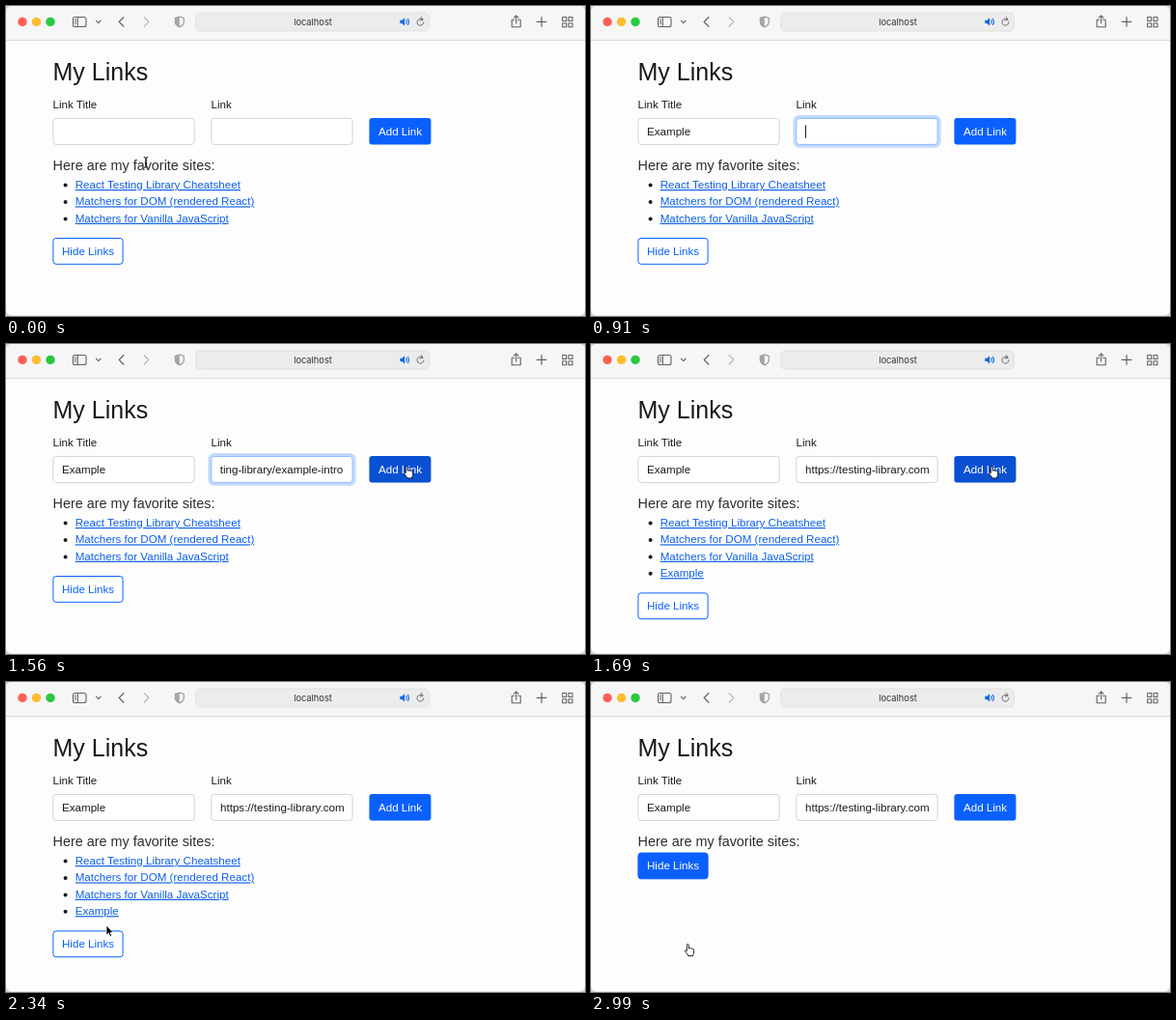
Write an HTML page that moves like this. It is 600 by 321 pixels and loops after 3250 ms.

```html
<!DOCTYPE html>
<html lang="en">
<head>
<meta charset="utf-8">
<title>My Links</title>
<style>
  html, body { margin: 0; height: 100%; overflow: hidden; background: #d2d2d2; }
  svg { display: block; width: 600px; height: 321px; font: 11.6px "Liberation Sans", Arial, sans-serif; fill: #17191c; }
  .icon { fill: none; stroke: #636363; stroke-width: 1.1; stroke-linecap: round; stroke-linejoin: round; }
  .pale { stroke: #b9b9b9; }
  .field rect { fill: #fff; stroke: #cfd3d8; }
  .field .ring { fill: none; stroke: #c2dafe; stroke-width: 3; visibility: hidden; }
  .focus .ring { visibility: visible; }
  .focus .box { stroke: #86b5fe; }
  .link { fill: #0b5fe8; text-decoration: underline; }
  .link.hover { fill: #0a48b0; }
  .solid { fill: #0a60fe; }
  .solid.hover { fill: #0a50d2; }
  .outline rect { fill: #fff; stroke: #0a60fe; }
  .outline text { fill: #0a60fe; }
  .outline.hover rect { fill: #0a60fe; }
  .outline.hover text { fill: #fff; }
</style>
</head>
<body>
<svg viewBox="0 0 600 321">
  <defs>
    <clipPath id="window"><rect width="600" height="320.5" rx="6"/></clipPath>
    <clipPath id="urlArea"><rect x="221.5" y="118" width="128.8" height="24"/></clipPath>
  </defs>

  <g clip-path="url(#window)">
    <rect width="600" height="321" fill="#fdfdfd"/>
    <rect width="600" height="35.5" fill="#f6f6f6"/>
    <rect y="35" width="600" height="1" fill="#d9d9d9"/>
  </g>

  <circle cx="17" cy="16.4" r="4.7" fill="#ff5f57"/>
  <circle cx="31.5" cy="16.4" r="4.7" fill="#febc2e"/>
  <circle cx="46" cy="16.4" r="4.7" fill="#28c840"/>

  <g class="icon">
    <rect x="69.5" y="11.5" width="13.5" height="10" rx="2"/>
    <path d="M74.3 11.5v10M71.3 14h1.3M71.3 16h1.3M71.3 18h1.3"/>
    <path d="M93.4 15.2l2.4 2.4 2.4-2.4"/>
    <path d="M121.8 11.8l-4.6 4.6 4.6 4.6" stroke-width="1.3"/>
    <path class="pale" d="M143.2 11.8l4.6 4.6-4.6 4.6" stroke-width="1.3"/>
    <path d="M179.8 11l4.5 1.6v4q0 3.4-4.5 5.2-4.5-1.8-4.5-5.2v-4z" stroke="#929292"/>
    <path d="M179.8 11v10.8q-4.5-1.8-4.5-5.2v-4z" fill="#a6a6a6" stroke="none"/>
  </g>

  <rect x="196.8" y="7" width="241.5" height="19" rx="4.5" fill="#ececec" stroke="#dcdcdc" stroke-width=".8"/>
  <text x="318" y="20" text-anchor="middle" font-family="Inter, sans-serif" font-size="9.3" fill="#333">localhost</text>
  <path d="M408.3 14.7h2l2.8-2.5v8.4l-2.8-2.5h-2z" fill="#1069e5"/>
  <g class="icon">
    <path d="M414.8 14.6q1.2 1.8 0 3.6M416.4 13.3q2.2 3.1 0 6.2" stroke="#1069e5"/>
    <path d="M432 14.2a3.5 3.5 0 1 0 1 2.5M430.2 11.4l1.9 2.7-3 .9" stroke-width=".9"/>
    <path d="M526.7 14.2h-2.5v7.6h9v-7.6h-2.5M528.7 18v-8M526.4 12.1l2.3-2.3 2.3 2.3"/>
    <path d="M555 11.6v9.6M550.2 16.4h9.6" stroke-width="1.2"/>
    <path d="M576.7 11.5h4v4h-4zM583 11.5h4v4h-4zM576.7 17.8h4v4h-4zM583 17.8h4v4h-4z"/>
  </g>

  <text x="48.5" y="77" font-size="25">My Links</text>
  <text x="48.5" y="106">Link Title</text>
  <text x="212.5" y="106">Link</text>

  <g class="field" id="titleField">
    <rect class="ring" x="47" y="114.6" width="150" height="30.6" rx="4.5"/>
    <rect class="box" x="48.9" y="116.4" width="146.3" height="27" rx="3"/>
    <text id="title" x="58" y="133.5"></text>
  </g>
  <g class="field" id="urlField">
    <rect class="ring" x="211" y="114.6" width="150" height="30.6" rx="4.5"/>
    <rect class="box" x="212.8" y="116.4" width="146.3" height="27" rx="3"/>
    <g clip-path="url(#urlArea)"><text id="url" y="133.5"></text></g>
  </g>
  <rect id="caret" y="123.3" width="1" height="13.4"/>

  <rect id="add" class="solid" x="376.4" y="116" width="64" height="27.6" rx="3"/>
  <text x="386" y="133.5" fill="#fff">Add Link</text>

  <text x="48.5" y="170.3" font-size="14.4" fill="#2c2e31">Here are my favorite sites:</text>
  <g id="list"></g>

  <g id="hide" class="outline">
    <rect x="48.9" y=".5" width="72.2" height="26.8" rx="3"/>
    <text x="58" y="17.7">Hide Links</text>
  </g>

  <g id="pointer">
    <path id="beam" d="M-2.2-5.5q2.2 0 2.2 1.5v8q0 1.5-2.2 1.5M2.2-5.5q-2.2 0-2.2 1.5v8q0 1.5 2.2 1.5M-1.2.8h2.4" fill="none" stroke="#111"/>
    <path id="arrow" d="M0 0v10.2l2.3-2.1 1.6 3.6 1.7-.8-1.6-3.5h3.2z" fill="#000" stroke="#fff" stroke-width=".8"/>
    <path id="hand" d="M2.3 7.5V1.4a1 1 0 0 1 2 0V5c0-.8 1.8-.8 1.9.2.2-.7 1.7-.6 1.8.4.3-.5 1.6-.3 1.6.8V9q0 1.5-1 2.5v1.1h-5v-.8Q2 10 .4 7.6C0 6.7 1.4 6.2 2.3 7.5z" fill="#fff" stroke="#111" stroke-width=".9"/>
  </g>
</svg>

<script>
const $ = id => document.getElementById(id);
const STEP = 130, LOOP = 3250, ROW = 17.4;
const sites = ['React Testing Library Cheatsheet', 'Matchers for DOM (rendered React)',
  'Matchers for Vanilla JavaScript', 'Example'];
const address = 'https://testing-library.com/docs/react-testing-library/example-intro';

// step, pointer shape, x, y; each entry holds until the next
const moves = [
  [0, 'beam', 145, 162], [1, 'beam', 131, 143], [2, 'beam', 122, 131], [3, ''],
  [9, 'arrow', 262, 158], [10, 'arrow', 342, 170], [11, 'arrow', 378, 154],
  [12, 'hand', 412, 126.3], [15, 'arrow', 272, 176], [16, 'hand', 129.3, 215.3],
  [17, 'hand', 115, 234], [18, 'arrow', 104, 252], [19, 'hand', 97, 271]
];

$('list').innerHTML = sites.map((name, i) =>
  `<g><circle cx="61.6" cy="${185.6 + i * ROW}" r="2"/>
   <text class="link" x="71.7" y="${189 + i * ROW}">${name}</text></g>`).join('');
const rows = [...$('list').children];

const show = (el, on) => el.style.display = on ? '' : 'none';
const mark = (el, name, on) => el.classList.toggle(name, on);

function draw(step) {
  const typing = step >= 2 && step < 7, pasting = step >= 7 && step < 13;
  const added = step >= 13, hidden = step >= 22;

  $('title').textContent = 'Example'.slice(0, Math.max(0, step - 2) * 2);
  $('url').textContent = step >= 8 ? address : '';
  $('url').setAttribute('x', pasting ? 349.3 : 222);
  $('url').setAttribute('text-anchor', pasting ? 'end' : 'start');
  mark($('titleField'), 'focus', typing);
  mark($('urlField'), 'focus', pasting);

  show($('caret'), typing || step === 7);
  $('caret').setAttribute('x', typing ? 58 + $('title').getComputedTextLength() : 222);

  show($('list'), !hidden);
  show(rows[3], added);
  rows.forEach((row, i) => mark(row.lastChild, 'hover', i === step - 14 && i > 1));
  mark($('add'), 'hover', step >= 12 && step < 15);

  const top = hidden ? 176.5 : 240 + (added ? ROW : 0);
  $('hide').setAttribute('transform', `translate(0 ${top})`);
  mark($('hide'), 'hover', step >= 19);

  const [, shape, x = 0, y = 0] = moves.filter(m => m[0] <= step).pop();
  for (const el of $('pointer').children) show(el, el.id === shape);
  $('pointer').setAttribute('transform', `translate(${x} ${y})`);
}

function tick() {
  draw(Math.floor(performance.now() % LOOP / STEP));
  requestAnimationFrame(tick);
}
tick();
</script>
</body>
</html>
```
